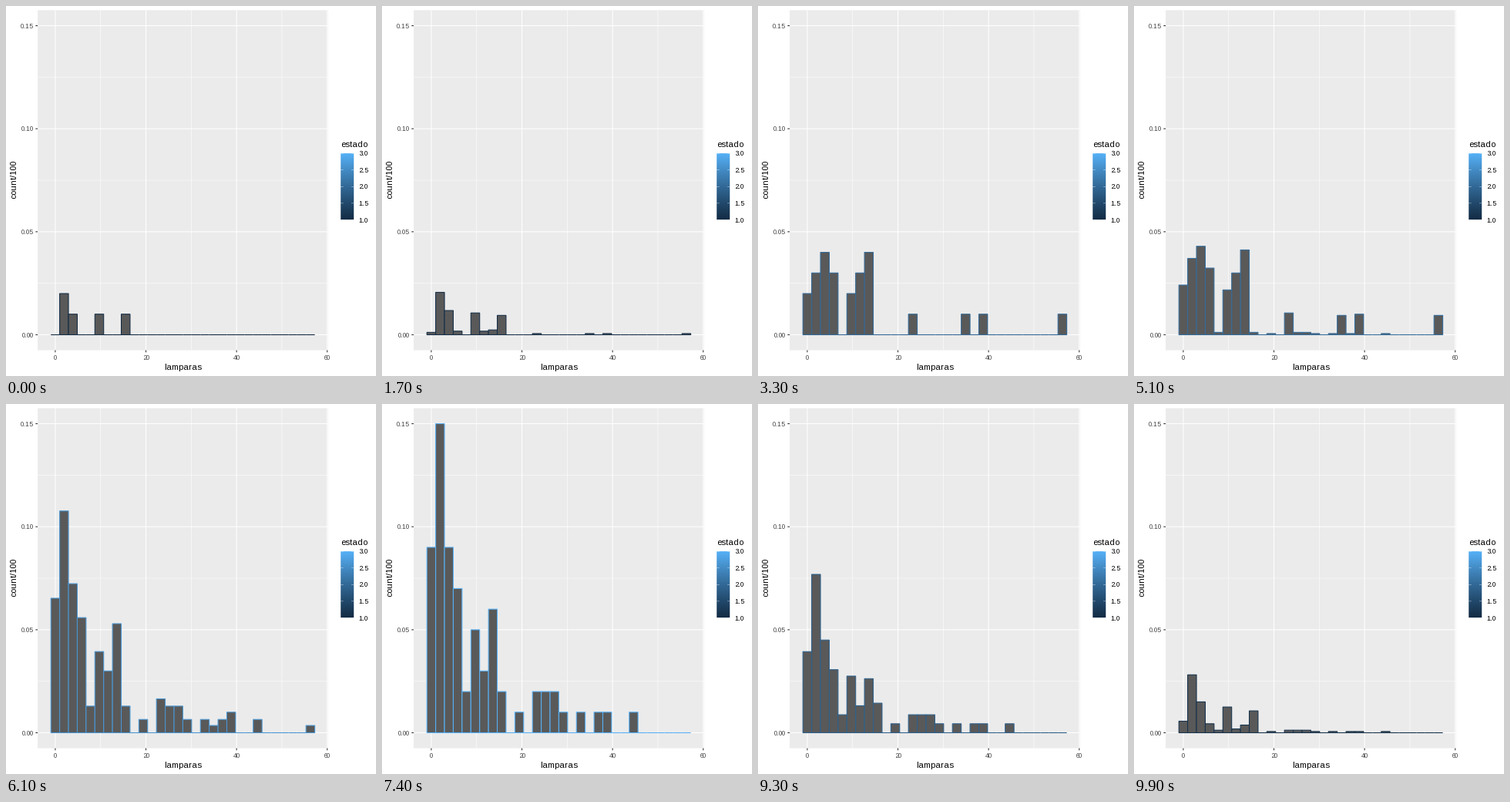
Recreate the animation shown at these times as a matplotlib script. Size 480 by 480 pixels, loop 10000 ms.

```python
import numpy as np
import matplotlib.pyplot as plt
from matplotlib.animation import FuncAnimation
from matplotlib.patches import Rectangle

DPI = 80
PX = 72 / DPI                 # points per pixel
LINE = 1.07                   # standard line width in pixels
LEFT, RIGHT, TOP, BOTTOM = 41.1, 417.72, 5.5, 446.55
BAR_X, BAR_TOP, BAR_W, BAR_H = 434.22, 191.1, 17.28, 86.4
FRAMES, RAMP = 100, 17        # loop length and longest transition
BINS, BIN_W = 30, 1.941
LOW, HIGH = "#132B43", "#56B1F7"

# Whole-pixel letter spacing
plt.rcParams.update({"font.family": "Liberation Sans", "text.hinting_factor": 1})

bins = np.arange(BINS)


def tent(mid, peak, slope, first, last):
    """Counts falling linearly away from a peak, within a run of bins."""
    inside = (bins >= first) & (bins <= last)
    return np.where(inside, peak - slope * abs(bins - mid), 0)


def singles(*where):
    return np.isin(bins, where).astype(int)


early = 2 * singles(1) + singles(*range(2, 9, 3))
middle = tent(2, 4, 1, 0, 3) + tent(7, 4, 1, 5, 7) + singles(12, 18, 20, 29)
late = (tent(1, 15, 6, 0, 2) + tent(3, 7, 5, 3, 4) + tent(5, 5, 2, 5, 6)
        + tent(7, 6, 4, 7, 8) + tent(13, 2, 0, 12, 14)
        + singles(10, 15, 17, 19, 20, 23))
states = [early, middle, late, early]


def gradient(u):
    """Blend the two end colours in a roughly perceptual space."""
    low, high = (np.array([int(c[i:i + 2], 16) / 255 for i in (1, 3, 5)]) ** 0.75
                 for c in (LOW, HIGH))
    return (low + (high - low) * u) ** (1 / 0.75)


# Data ranges are padded by 5 percent on each side
X_SPAN = BINS * BIN_W
X_SCALE = (RIGHT - LEFT) / (1.1 * X_SPAN)
Y_SCALE = (BOTTOM - TOP) / (1.1 * 0.15)


def x_px(x):
    return LEFT + (x + BIN_W / 2 + 0.05 * X_SPAN) * X_SCALE


def y_px(y):
    return BOTTOM - (y + 0.0075) * Y_SCALE


fig = plt.figure(figsize=(6, 6), dpi=DPI, facecolor="white")
ax = fig.add_axes([0, 0, 1, 1])


def line(xs, ys, color, width=LINE, z=1):
    ax.plot(xs, ys, color=color, lw=width * PX, solid_capstyle="butt",
            snap=False, zorder=z)


def label(x, y, text, size=8.8, color="black", **kw):
    ax.text(x, y, text, fontsize=size * PX, color=color, va="baseline", **kw)


def box(x, y, w, h, **kw):
    return ax.add_patch(Rectangle((x, y), w, h, snap=False, **kw))


# Panel, grid and axes
box(LEFT, TOP, RIGHT - LEFT, BOTTOM - TOP, fc="#EBEBEB", ec="none", zorder=0)
for x in range(0, 61, 10):
    px, major = x_px(x), x % 20 == 0
    line([px] * 2, [TOP, BOTTOM], "white", LINE if major else LINE / 2)
    if major:
        line([px] * 2, [BOTTOM, BOTTOM + 2.75], "#333333")
        label(px, 459, str(x), color="#4D4D4D", ha="center")
for i in range(7):
    py, major = y_px(i * 0.025), i % 2 == 0
    line([LEFT, RIGHT], [py] * 2, "white", LINE if major else LINE / 2)
    if major:
        line([LEFT - 2.75, LEFT], [py] * 2, "#333333")
        label(LEFT - 4.95, py + 3.1, f"{i * 0.025:.2f}", color="#4D4D4D", ha="right")
label((LEFT + RIGHT) / 2, 472, "lamparas", 11, ha="center")
label(13.3, (TOP + BOTTOM) / 2 - 0.8, "count/100", 11, ha="center",
      rotation=90, rotation_mode="anchor")

# Colour bar, trimmed to fractional pixel edges by a white outline
label(BAR_X, 183, "estado", 11)
ramp = np.array([[gradient(u)] for u in np.linspace(1, 0, 300)])
ax.imshow(ramp, extent=(434, 452, 278, 191), aspect="auto",
          interpolation="bilinear", zorder=2)
box(BAR_X - 1, BAR_TOP - 1, int(BAR_W) + 2, int(BAR_H) + 2,
    fc="none", ec="white", lw=2 * PX, zorder=3)
for v in np.arange(1, 3.1, 0.5):
    py = BAR_TOP + (3 - v) / 2 * BAR_H
    for x in (BAR_X, BAR_X + 0.8 * BAR_W):
        line([x, x + BAR_W / 5], [py] * 2, "white", 0.375, z=4)
    label(BAR_X + BAR_W + 5.5, py + 3.1, f"{v:.1f}")

bars = [box(x_px((i - 0.5) * BIN_W), y_px(0), BIN_W * X_SCALE, 0,
            fc="#595959", lw=LINE * PX, zorder=5) for i in bins]

ax.set_xlim(0, 480)
ax.set_ylim(480, 0)
ax.axis("off")


def draw(frame):
    # Each state holds still, then blends linearly into the next
    phase = sum(np.clip((frame - start) / min(RAMP, FRAMES - start), 0, 1)
                for start in range(RAMP - 1, FRAMES, 2 * RAMP))
    k = min(int(phase), 2)
    heights = states[k] + (states[k + 1] - states[k]) * (phase - k)
    edge = gradient(phase / 2 if phase < 2 else 3 - phase)
    for bar, h in zip(bars, heights):
        bar.set_height(-h / 100 * Y_SCALE)
        bar.set_edgecolor(edge)
    return bars


anim = FuncAnimation(fig, draw, frames=FRAMES, interval=100, repeat=True, blit=False)
plt.show()
```
